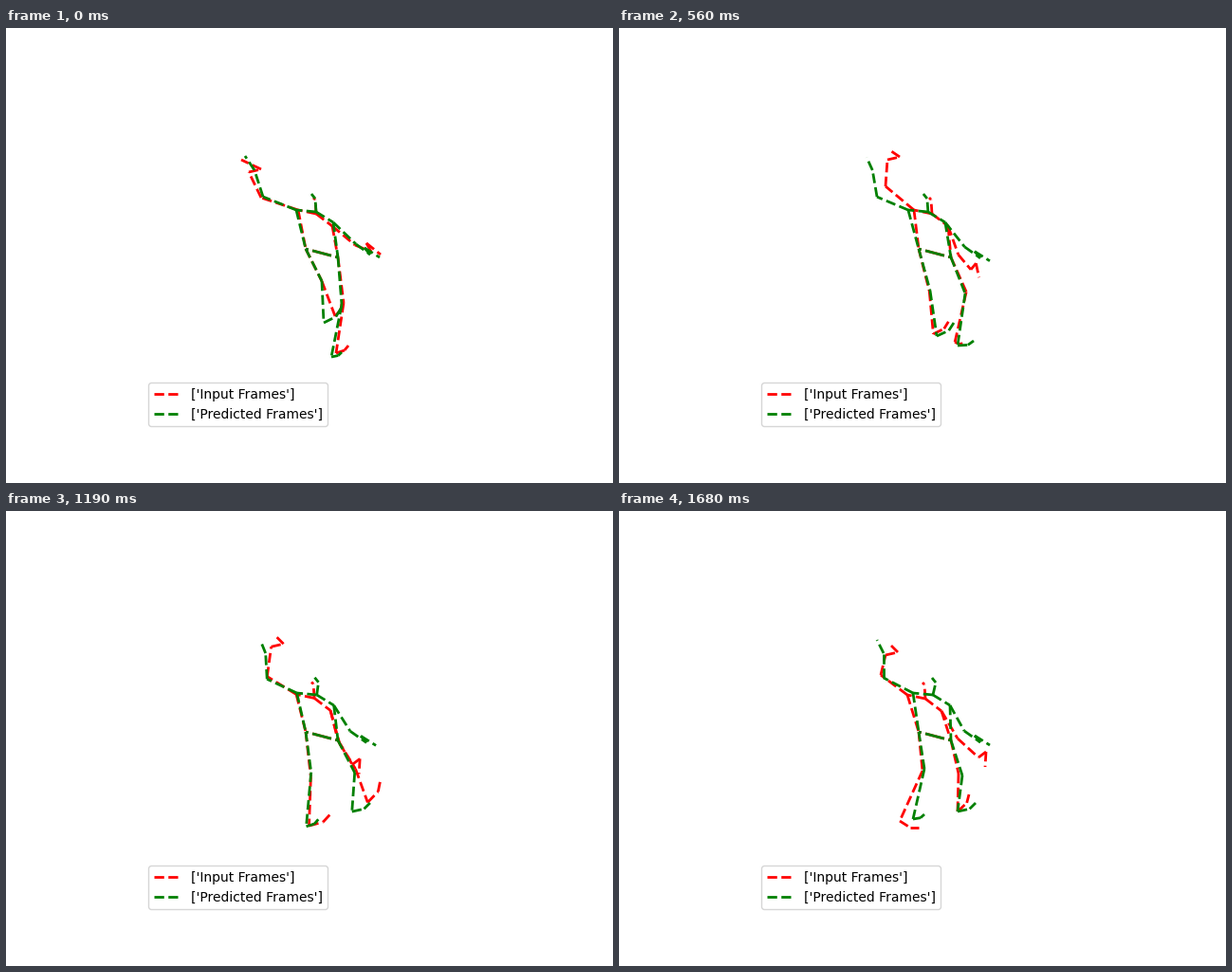
Animation, 640 px wide and 480 px high, one loop 1750 ms. Source, as a matplotlib script:

```python
import numpy as np
import matplotlib.pyplot as plt
from matplotlib.animation import FuncAnimation

W, H, DPI = 640, 480, 100
FRAMES, STEP_MS = 25, 70
TIME = np.arange(FRAMES, dtype=float)


def glide(beats, *points):
    """Smooth path through a few points, resting outside the first and last beat."""
    t, p = np.array(beats, float), np.array(points, float)
    slope = np.gradient(p, t, axis=0)
    now = np.clip(TIME, t[0], t[-1])
    i = np.clip(np.searchsorted(t, now, side="right") - 1, 0, len(t) - 2)
    span = (t[i + 1] - t[i])[:, None]
    u = (now - t[i])[:, None] / span
    rise = u * u * (3 - 2 * u)
    return (p[i] * (1 - rise) + p[i + 1] * rise
            + span * u * (1 - u) * (slope[i] * (1 - u) - slope[i + 1] * u))


def ease(start, end, first, last):
    """Offset that turns from first to last between two times."""
    u = np.clip((TIME - start) / (end - start), 0, 1)[:, None]
    return np.array(first) + u * u * (3 - 2 * u) * np.subtract(last, first)


def foot(ankle, toe):
    """Middle of the foot: past halfway to the toe, bulging towards the sole."""
    along = toe - ankle
    sole = along[:, ::-1] * [-1, 1]
    return ankle + 0.6 * along + 0.14 * sole


class Skeleton:
    def __init__(self, ax, color, label):
        self.ax, self.color, self.label = ax, color, label
        self.bones = []
        self.pelvis, self.hip_l, self.hip_r = (
            np.tile(p, (FRAMES, 1)) for p in ((333, 237.5), (316, 233), (350, 242)))
        self.chain(self.pelvis, self.hip_r)
        self.chain(self.pelvis, self.hip_l)
        self.bones[0][0].set_label(label)

    def chain(self, *joints):
        for a, b in zip(joints, joints[1:]):
            line, = self.ax.plot([], [], "--", color=self.color, lw=2)
            self.bones.append((line, a, b))

    def torso(self, neck, left, right, head, nose):
        """Head and shoulders ride on the neck at given offsets."""
        self.shoulder_l, self.shoulder_r = neck + left, neck + right
        self.chain(neck, neck + head, neck + head + nose)
        self.chain(neck, self.shoulder_l, self.hip_l)
        self.chain(neck, self.shoulder_r, self.hip_r)

    def leg(self, hip, knee, ankle, toe):
        self.chain(hip, knee, ankle, foot(ankle, toe), toe)

    def pose(self, n):
        for line, a, b in self.bones:
            line.set_data(*zip(a[n], b[n]))
        return [bone[0] for bone in self.bones]


def make_input(ax):
    s = Skeleton(ax, "red", "['Input Frames']")
    neck = glide((0, 8, 20), (327, 196), (330, 196), (323, 198))
    s.torso(neck, (-19, -4), (17, 13), (-1, -15), (-2, -2))

    beats = 2, 8, 20, 24
    elbow = glide(beats, (269, 179), (281, 167), (274, 176), (276, 173))
    wrist = glide(beats, (256, 152), (283, 139), (278, 147), (281, 152))
    hand = wrist + (13, -3)
    s.chain(s.shoulder_l, elbow, wrist, hand, hand + ease(5, 10, (-21, -10), (-7, -7)))

    beats = 2, 12, 20, 24
    elbow = glide(beats, (368, 229), (353, 244), (353, 244), (357, 240))
    wrist = glide(beats, (385, 236), (365, 264), (369, 266), (379, 260))
    hand = wrist + ease(3, 10, (-5, -9), (8, -6))
    s.chain(s.shoulder_r, elbow, wrist, hand, hand + ease(4, 10, (15, 12), (-1, 16)))

    beats = 0, 7, 18, 24
    s.leg(s.hip_l,
          glide(beats, (333, 267), (328, 277), (321, 280), (320, 274)),
          glide(beats, (347, 304), (333, 321), (317, 332), (296, 327)),
          glide(beats, (354, 291), (348, 308), (339, 322), (316, 334)))
    beats = 0, 6, 15, 24
    s.leg(s.hip_r,
          glide(beats, (356, 290), (364, 281), (370, 272), (358, 277)),
          glide(beats, (348, 343), (348, 337), (383, 308), (357, 317)),
          glide(beats, (361, 335), (356, 341), (396, 287), (369, 299)))
    return s


def make_predicted(ax):
    s = Skeleton(ax, "green", "['Predicted Frames']")
    beats = 0, 12, 24
    neck = glide(beats, (327, 194), (326, 194), (331, 194))
    s.torso(neck, (-21, -2), (18, 11), ease(8, 22, (-1, -14), (3, -13)), (-4, -5))

    s.chain(s.shoulder_l,
            glide(beats, (271, 178), (273, 178), (279, 176)),
            glide(beats, (262, 150), (270, 150), (279, 150)),
            glide(beats, (252, 135), (265, 137), (272, 136)))

    elbow = glide(beats, (369, 228), (363, 232), (364, 232))
    wrist = glide(beats, (384, 239), (380, 244), (381, 244))
    hand = wrist + (-6, -7)
    s.chain(s.shoulder_r, elbow, wrist, hand, hand + (16, 10))

    beats = 0, 8, 16, 24
    s.leg(s.hip_l,
          glide(beats, (333, 267), (328, 277), (322, 276), (322, 272)),
          glide(beats, (335, 311), (335, 325), (318, 333), (310, 325)),
          glide(beats, (353, 296), (353, 311), (331, 325), (322, 320)))
    s.leg(s.hip_r,
          glide(beats, (354, 292), (365, 280), (368, 276), (362, 279)),
          glide(beats, (343, 347), (357, 335), (365, 318), (357, 317)),
          glide(beats, (354, 342), (374, 330), (384, 309), (376, 308)))
    return s


fig = plt.figure(figsize=(W / DPI, H / DPI), dpi=DPI, facecolor="white")
ax = fig.add_axes([0, 0, 1, 1])
ax.set_xlim(0, W)
ax.set_ylim(H, 0)
ax.axis("off")

figures = [make_input(ax), make_predicted(ax)]
ax.legend(loc="lower left", bbox_to_anchor=(143.2 / W, 52.8 / H), fontsize=10)


def draw(n):
    return [line for s in figures for line in s.pose(n)]


anim = FuncAnimation(fig, draw, frames=FRAMES, interval=STEP_MS, repeat=True, repeat_delay=0)
plt.show()
```
